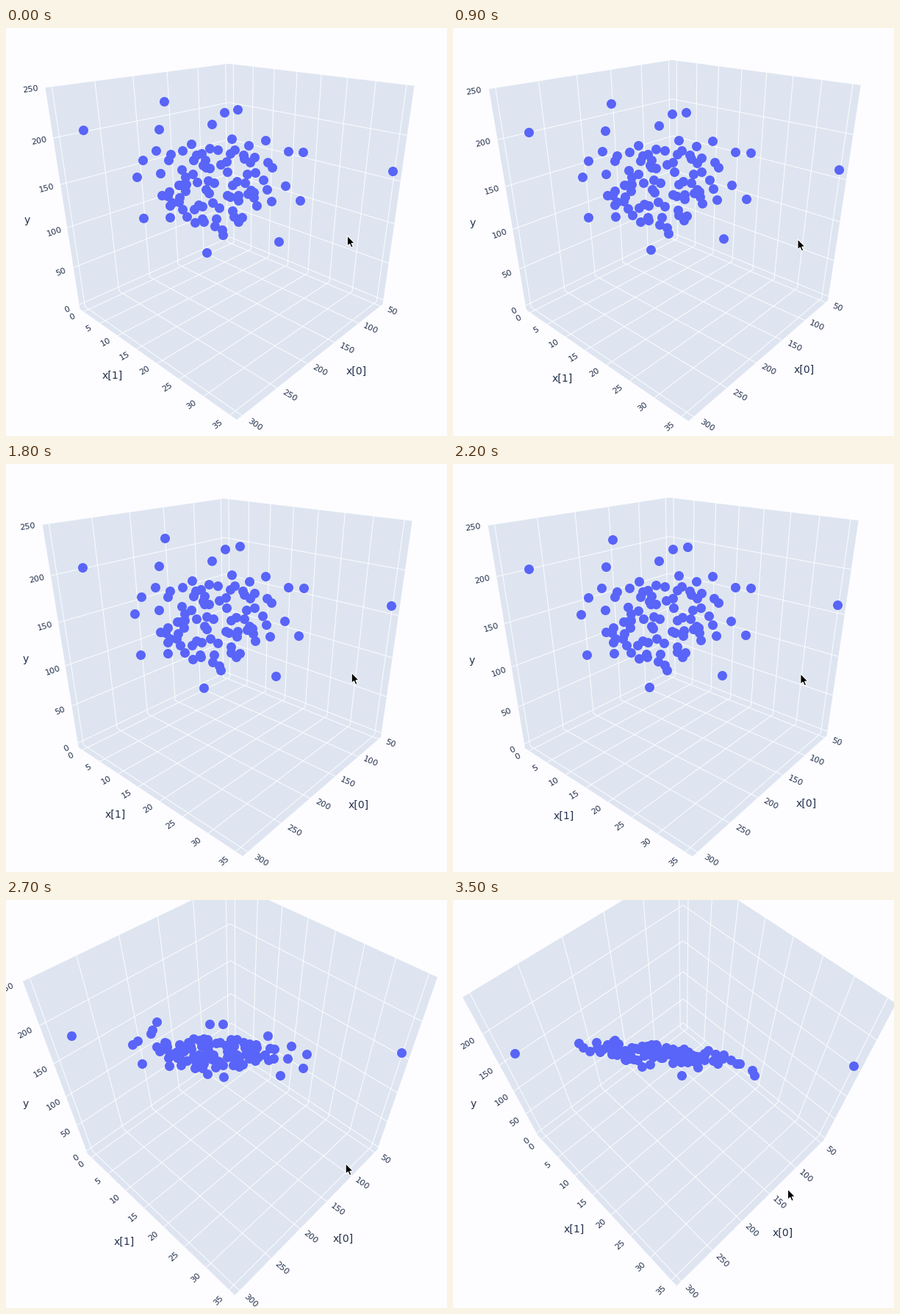
A matplotlib script for the animation above (3.8 s loop, 600 by 556 pixels).

```python
import numpy as np
import matplotlib.pyplot as plt
from matplotlib.animation import FuncAnimation
from matplotlib.collections import LineCollection
from matplotlib.patches import Polygon

W, H, DPI = 600, 556, 100
PT = 72 / DPI
FRAMES, STEP, LAST = 38, 100, 35
BG, PANEL, DOT, INK = "#fdfcff", "#dee5f1", "#5964f8", "#22304a"

# Camera: focal length, principal point, distance, look-at point
FOCAL, PX, PY, DIST = 701, 314.2, 287, 2.185
CENTER = np.array([0.063, 0.019, -0.118])

# Drag path: seconds, azimuth (rad), elevation (deg)
KEYS = np.array([(0, .029, 25.6), (.5, .024, 27.5), (.9, .054, 27.1),
                 (1.4, .046, 25.6), (2.2, .075, 26.5), (2.4, .060, 34),
                 (2.7, .017, 49.4), (3.0, 0, 55), (3.5, -.019, 60.3)])
AZ0, EL0 = KEYS[0, 1], np.radians(KEYS[0, 2])

# Axis ranges and ticks for x[0], x[1], y
LOW_END = np.array([44, -1.2, -6])
HIGH_END = np.array([307, 36.2, 250])
TICKS = [np.arange(50, 301, 50), np.arange(0, 36, 5), np.arange(0, 251, 50)]

# Outlying samples in the opening view: x, y, depth off the plane
OUTLIERS = [(105, 139, -.06), (526, 195, .055), (215, 100, 0), (208, 138, .01),
            (204, 167, .04), (186, 180, 0), (178, 203, .02), (187, 259, -.05),
            (220, 229, .06), (297, 115, .035), (315, 111, -.065),
            (280, 131, .06), (353, 153, .04), (384, 168, 0), (404, 169, -.055),
            (380, 215, -.01), (400, 235, -.055), (371, 291, -.01),
            (295, 282, -.1), (273, 306, 0)]


def spin(v, az):
    p, q, h = np.moveaxis(np.asarray(v, float), -1, 0)
    c, s = np.cos(az), np.sin(az)
    return np.stack([p * c - q * s, p * s + q * c, h], -1)


def project(v, az, el):
    p, q, h = np.moveaxis(spin(v, az), -1, 0)
    c, s = np.cos(el), np.sin(el)
    k = FOCAL / (DIST - p * c - h * s)
    return np.stack([PX + q * k, PY - (h * c - p * s) * k], -1)


def place(unit):
    """Unit-cube position to coordinates around the look-at point."""
    x, y, z = np.moveaxis(np.asarray(unit, float) - 0.5, -1, 0)
    return np.stack([x + y, y - x, z * 2 ** 0.5], -1) / 2 ** 0.5 - CENTER


def cloud(n, seed=4):
    """Evenly filled, jittered ellipse of samples: x, y, depth."""
    rng = np.random.default_rng(seed)
    k = np.arange(n) + 0.5
    r, turn = np.sqrt(k / n), k * np.pi * (3 - 5 ** 0.5)
    return np.stack([285 + 76 * r * np.cos(turn) + rng.normal(0, 6, n),
                     212 + 66 * r * np.sin(turn) + rng.normal(0, 6, n),
                     rng.normal(0, 0.033, n)], -1)


def cast(spots, az, el, base=0.3816, tilt=1.3305, lean=-0.10):
    """Cast screen spots onto the plane h = base + tilt*p + lean*q."""
    x, y, lift = spots.T
    a, b = (x - PX) / FOCAL, (PY - y) / FOCAL
    c, s = np.cos(el), np.sin(el)
    t = (base + tilt * DIST * c - DIST * s) / (
        b * (c + tilt * s) + tilt * c - s - lean * a) + lift
    p = (DIST - t) * c - b * t * s
    h = (DIST - t) * s + b * t * c
    return spin(np.stack([p, a * t, h], -1), -az)


def frac(axis, value):
    return (value - LOW_END[axis]) / (HIGH_END[axis] - LOW_END[axis])


def grid_lines():
    lines = []
    for axis in range(3):
        for value in TICKS[axis]:
            for along in {0, 1, 2} - {axis}:
                ends = np.zeros((2, 3))
                ends[:, axis] = frac(axis, value)
                ends[1, along] = 1
                lines.append(ends)
    return place(lines)


def make_labels():
    """Anchor, label position, text, size, tilted."""
    edges = [((0, 1, 0), "x[0]"), ((1, 0, 0), "x[1]"), ((1, 0, 0), "y")]
    out = []
    for axis, (way, title) in enumerate(edges):
        marks = [(frac(axis, v), 0.06, str(v), 11.3, True) for v in TICKS[axis]]
        for f, gap, text, size, tilted in marks + [(0.5, 0.164, title, 14, False)]:
            spot = np.array(way, float)
            spot[axis] = f
            out.append((place(spot), place(spot + gap * np.array(way)),
                        text, size, tilted))
    return out


fig = plt.figure(figsize=(W / DPI, H / DPI), dpi=DPI, facecolor=BG)
ax = fig.add_axes([0, 0, 1, 1])
ax.set(xlim=(0, W), ylim=(H, 0))
ax.axis("off")

samples = cast(np.concatenate([OUTLIERS, cloud(80)]), AZ0, EL0)
outline = place([(1, 0, 1), (0, 0, 1), (0, 1, 1), (0, 1, 0), (1, 1, 0), (1, 0, 0)])
grid = grid_lines()
labels = make_labels()
ARROW = np.array([(0, 0), (0, 14.2), (3.2, 11.3), (5.4, 16.2), (7.8, 15.2),
                  (5.7, 10.4), (10, 10.2)])

box = ax.add_patch(Polygon(np.zeros((6, 2)), fc=PANEL, ec="none"))
mesh = ax.add_collection(LineCollection([], colors="white", lw=PT, alpha=0.9))
dots, = ax.plot([], [], "o", color=DOT, ms=13 * PT, mew=0)
texts = [ax.text(0, 0, text, size=size * PT, color=INK, family="DejaVu Sans",
                 ha="center", va="center")
         for _, _, text, size, _ in labels]
arrow = ax.add_patch(Polygon(ARROW, fc="black", ec="white", lw=1.1 * PT, zorder=9))


def draw(i):
    now = min(i, LAST) * STEP / 1000
    az, deg = (np.interp(now, KEYS[:, 0], col) for col in KEYS.T[1:])
    el = np.radians(deg)
    box.set_xy(project(outline, az, el))
    mesh.set_segments(project(grid, az, el))
    dots.set_data(*project(samples, az, el).T)
    for item, (anchor, spot, _, _, tilted) in zip(texts, labels):
        start, stop = project([anchor, spot], az, el)
        item.set_position(stop)
        if tilted:
            dx, dy = stop - start
            item.set_rotation(np.degrees(np.arctan(-dy / dx)))
    # The pointer drags the view
    arrow.set_xy(ARROW + (459 + 185 * az, 283 + 3.2 * (deg - KEYS[0, 2])))
    return [box, mesh, dots, arrow, *texts]


anim = FuncAnimation(fig, draw, frames=FRAMES, interval=STEP, repeat=True,
                     repeat_delay=0, blit=False)
plt.show()
```
